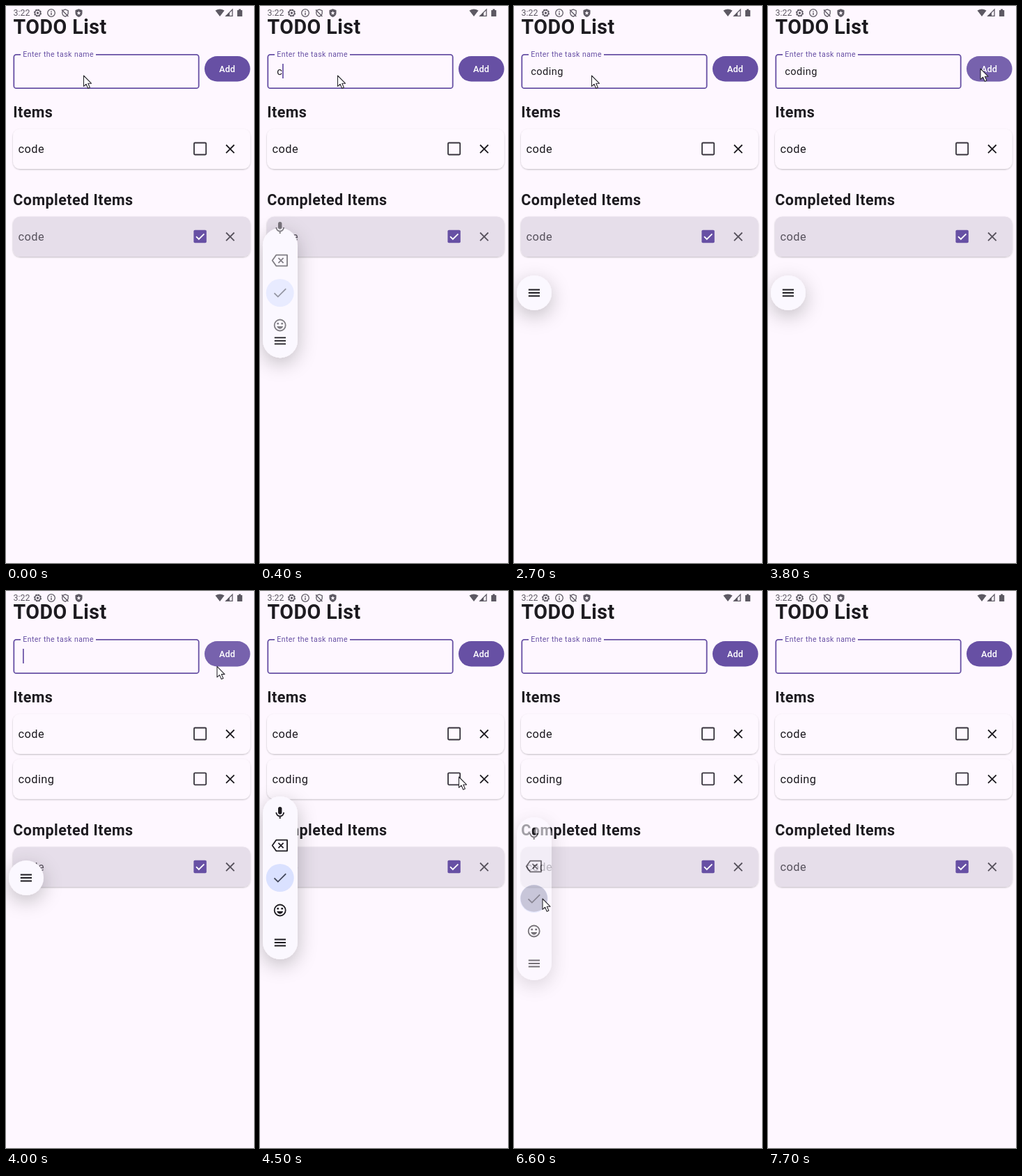
Write an HTML page that moves like this. It is 356x800 px and loops after 7.8 s.

```html
<!DOCTYPE html>
<html lang="en">
<head>
<meta charset="utf-8">
<title>Task list</title>
<style>
  html, body { margin: 0; width: 100%; height: 100%; overflow: hidden; background: #fef7ff; }
  svg { display: block; width: 356px; height: 800px; font-family: Roboto, sans-serif; fill: #1d1b20; }
  .title { font: 700 28.6px Roboto, sans-serif; letter-spacing: .45px; }
  .head { font: 700 21.5px Roboto, sans-serif; letter-spacing: .45px; }
  .task { font-size: 16.4px; letter-spacing: .45px; }
  .entry { font-size: 14.6px; letter-spacing: .43px; }
  .label { font-size: 10.6px; letter-spacing: .42px; fill: #6750a4; }
  .line { fill: none; stroke: #1d1b20; stroke-width: 1.8; }
  .status { fill: #5d5963; }
  .status .line { stroke: #5d5963; stroke-width: 1.3; }
</style>
</head>
<body>
<svg viewBox="0 0 356 800">
  <defs>
    <filter id="low" x="-10%" y="-20%" width="120%" height="150%">
      <feDropShadow dx="0" dy="1" stdDeviation="1" flood-opacity=".25"/>
    </filter>
    <filter id="high" filterUnits="userSpaceOnUse" x="-80" y="200" width="260" height="460">
      <feDropShadow dx="0" dy="8" stdDeviation="14" flood-opacity=".24"/>
    </filter>
  </defs>
  <rect width="356" height="800" fill="#fef7ff"/>

  <text class="title" x="10.5" y="40">TODO List</text>
  <g class="status">
    <text x="10.5" y="14.3" font-size="12.4">3:22</text>
    <g transform="translate(45.5 10)">
      <circle class="line" r="4.7" style="stroke-width:1.6;stroke-dasharray:2.6 1"/>
      <circle class="line" r="3.8"/><circle r="1.7"/>
    </g>
    <g transform="translate(65 10)">
      <circle class="line" r="5.3"/><path d="M-.7-3h1.4v1.4h-1.4zM-.7-.6h1.4v3.6h-1.4z"/>
    </g>
    <g transform="translate(85 10)" class="line">
      <path d="M-4-3.4 0-5 4.2-3.4V0Q4.2 3.5 0 5.2Q-4.2 3.5-4.2 0V-2.5M-5-4.5 4.4 5"/>
    </g>
    <g transform="translate(104.5 10)">
      <path d="M0-5.8 5-4V0Q5 4 0 6Q-5 4-5 0V-4Z"/>
      <path fill="#fef7ff" d="M0-3 .8-.9 3-.8 1.3.6 1.9 2.8 0 1.6-1.9 2.8-1.3.6-3-.8-.8-.9Z"/>
    </g>
    <path d="M300.5 6.6Q307 2.2 313.5 6.6L307 15Z"/>
    <path class="line" d="M315.8 14.3H325V5Z"/><path d="M315 15 321 9V15Z"/>
    <path d="M332 6h2V4.6h3.2V6h2V15H332Z"/>
  </g>

  <rect x="11.3" y="69.8" width="265.4" height="48.4" rx="3.5" fill="none" stroke="#6750a4" stroke-width="1.8"/>
  <path d="M21 69.5H129" stroke="#fef7ff" stroke-width="4"/>
  <text class="label" x="24.2" y="72.6">Enter the task name</text>
  <text class="entry" id="entry" x="24.3" y="99"></text>
  <rect id="caret" y="83" width="1.7" height="21" fill="#6750a4"/>

  <rect x="285" y="72" width="65.5" height="36.5" rx="18.25" fill="#6750a4"/>
  <rect id="hover" x="285" y="72" width="65.5" height="36.5" rx="18.25" fill="#fff" opacity=".1"/>
  <text x="317.6" y="94.7" text-anchor="middle" font-size="12.7" font-weight="500" letter-spacing=".1" fill="#fff">Add</text>

  <text class="head" x="10.3" y="160.3">Items</text>
  <g id="cards"></g>
  <g id="done"><text class="head" x="10.3" y="286.3">Completed Items</text></g>

  <g id="bar">
    <rect id="pill" x="4" width="50" rx="25" fill="#fbf8ff" filter="url(#high)"/>
    <g id="tools">
      <g transform="translate(28.7 318.5)">
        <rect x="-2.7" y="-8.5" width="5.4" height="10.8" rx="2.7"/>
        <path class="line" d="M-5.4-.5A5.4 5.4 0 0 0 5.4-.5M0 4.8V8.4"/>
      </g>
      <g class="line" transform="translate(28.7 365.5)">
        <path d="M-11 0-5.5-7.8H10.3V7.8H-5.5ZM-2.3-3.6 4.9 3.6M4.9-3.6-2.3 3.6" stroke-linejoin="round"/>
      </g>
      <circle cx="28.7" cy="412" r="20" fill="#dae1ff"/>
      <path class="line" style="stroke:#414659" d="M20.5 412.3 25.8 417.6 37.2 406.2"/>
      <circle id="press" cx="28.7" cy="411.5" r="19.3" fill="#2c2430" opacity=".3"/>
      <g transform="translate(28.7 458.5)">
        <circle class="line" r="8"/>
        <circle cx="-3" cy="-2.3" r="1.4"/><circle cx="3" cy="-2.3" r="1.4"/>
        <path d="M-4.5 1.5H4.5Q3 5.3 0 5.3T-4.5 1.5Z"/>
      </g>
    </g>
    <path id="menu" class="line" d="M20.8-4.5H37M20.8 0H37M20.8 4.5H37"/>
  </g>

  <path id="cursor" d="M0 0V15.4L3.6 12.2 6.2 18.2 8.9 17 6.3 11.2H11Z" fill="#fff" stroke="#2b2930" stroke-width="1.1" stroke-linejoin="round"/>
</svg>
<script>
const LOOP = 7800, STEP = 100, ADDED = 4000;
const $ = id => document.getElementById(id);
const set = (id, attrs) => { for (const k in attrs) $(id).setAttribute(k, attrs[k]); };
const show = (id, on) => set(id, { visibility: on ? 'visible' : 'hidden' });

function card(name, y, checked) {
  const ink = checked ? '#57525d' : '#1d1b20';
  const box = checked
    ? `<rect x="269.4" y="${y + 19.3}" width="18.4" height="18.4" rx="1.8" fill="#6750a4"/>
       <path class="line" style="stroke:#fff" d="M273 ${y + 28.6}l3.8 3.8 7.6-7.6"/>`
    : `<rect class="line" x="270" y="${y + 20}" width="17.2" height="17" rx="1.2" style="stroke:#37333c"/>`;
  return `<g>
    <rect x="10" y="${y}" width="340.6" height="57.5" rx="10.4" fill="${checked ? '#e6deea' : '#fef8ff'}" filter="url(#low)"/>
    <text class="task" x="17.4" y="${y + 34.4}" style="fill:${ink}">${name}</text>${box}
    <path class="line" style="stroke:${ink}" d="M316 ${y + 23}l11.6 11.6m0-11.6l-11.6 11.6"/></g>`;
}
$('cards').innerHTML = card('code', 176.5) + `<g id="added">${card('coding', 241.3)}</g>`;
$('done').innerHTML += card('code', 302.5, true);

// Each row: time, then values
const cursorPath = [[0, 111.5, 100], [2800, 111.5, 100], [3400, 305, 90], [3900, 305, 90],
  [4400, 285.5, 267], [4600, 285.5, 267], [5200, 195, 455], [6000, 33, 417], [6100, 33, 417],
  [6300, 38, 420], [6500, 38, 421], [6600, 41, 442], [7300, 190, 805]];
const barPath = [[100, 0, 60], [300, 1, 0], [6500, 1, 0], [6600, .6, 30], [6800, 0, 70]];
const openPath = [[300, 1], [600, 0], [ADDED, 0], [4300, 1]];
const typed = [[0, ''], [400, 'c'], [1200, 'co'], [1500, 'cod'], [1800, 'codin'], [2200, 'coding'], [ADDED, '']];
const caretOn = [[400, 900], [1200, 2700], [3200, 3700], [4000, 4500], [5000, 5500], [6000, 6500], [7000, 7400]];

function sample(rows, t) {
  const i = rows.findIndex(r => r[0] > t);
  if (i === 0) return rows[0].slice(1);
  if (i < 0) return rows.at(-1).slice(1);
  const a = rows[i - 1], b = rows[i], p = (t - a[0]) / (b[0] - a[0]);
  const ease = p * p * (3 - 2 * p);
  return a.slice(1).map((v, k) => v + (b[k + 1] - v) * ease);
}

function render(t) {
  const text = typed.findLast(r => r[0] <= t)[1];
  $('entry').textContent = text;
  set('caret', { x: 24 + (text ? $('entry').getComputedTextLength() : 0) });
  show('caret', caretOn.some(([a, b]) => t >= a && t < b));
  show('hover', t >= 3300 && t < 4100);

  show('added', t >= ADDED);
  set('done', { transform: `translate(0 ${t >= ADDED ? 65 : 0})` });

  const [alpha, drop] = sample(barPath, t), [open] = sample(openPath, t);
  const half = 25 + 92 * open;
  set('bar', { opacity: alpha, transform: `translate(0 ${drop})` });
  set('pill', { y: 412 - half, height: 2 * half });
  set('tools', { opacity: open * open });
  set('menu', { transform: `translate(0 ${412 + 93 * open})` });
  show('press', t >= 6400 && t < 6800);

  set('cursor', { transform: `translate(${sample(cursorPath, t)})` });
}

const start = performance.now();
function tick() {
  const t = (performance.now() - start) % LOOP;
  render(Math.floor(t / STEP) * STEP);
  requestAnimationFrame(tick);
}
tick();
</script>
</body>
</html>
```
